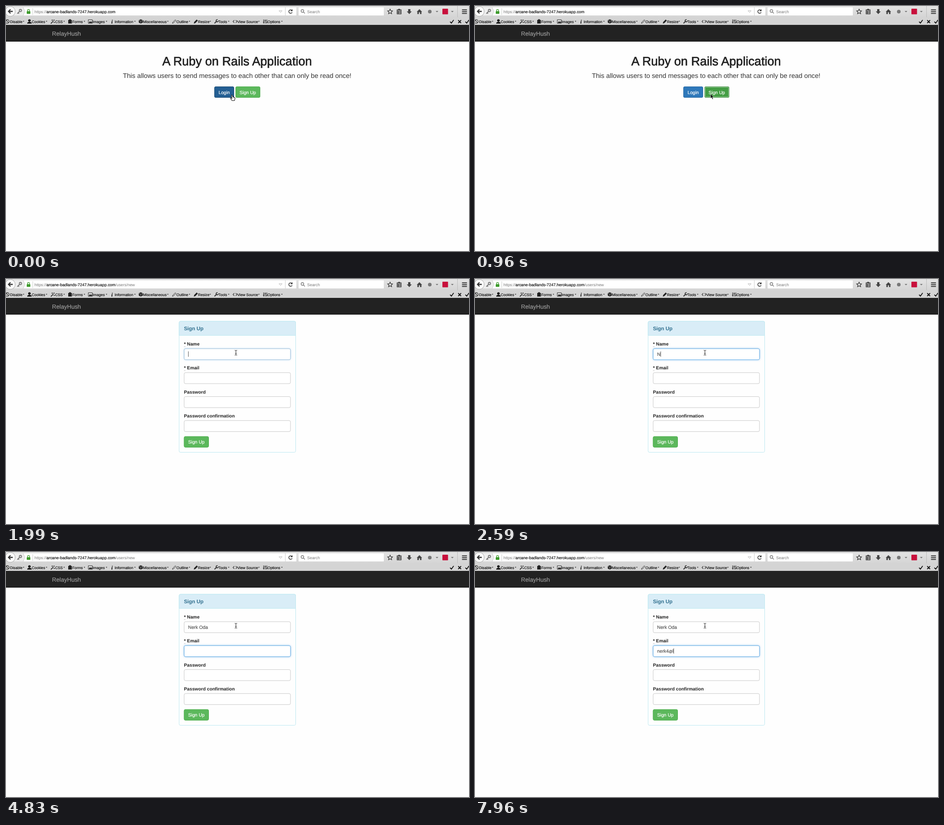
Animation of 1027x545 px, one loop 8000 ms. Source, as an HTML page:

```html
<!DOCTYPE html>
<html lang="en">
<head>
<meta charset="utf-8">
<title>Sign up demo</title>
<style>
html, body { margin: 0; width: 100%; height: 100%; overflow: hidden; background: #fefefe; }
svg { display: block; font-family: "Liberation Sans", Arial, sans-serif; text-rendering: geometricPrecision; }
text { white-space: pre; stroke-width: .2px; }
.ui { font-size: 8.92px; fill: #777; }
.host { fill: #111; stroke: #111; }
.tool { font-size: 8.25px; fill: #111; stroke: #111; }
.body { font-size: 10.27px; fill: #555; stroke: #555; }
.label { font-size: 10.2px; font-weight: bold; fill: #222; }
.btn { font-size: 10.27px; fill: #fff; stroke: #fff; }
.title { font-size: 27.15px; fill: #222; stroke: #222; stroke-width: .75px; }
.lead { font-size: 14.7px; fill: #333; }
.line { fill: none; stroke: #333; stroke-width: 1.3; }
.box { fill: #fff; stroke: #c8c8c8; }
.glow { fill: #fff; stroke: #66afe9; filter: drop-shadow(0 0 2px rgba(102,175,233,.7)); }
#login { fill: #2e78ba; stroke: #2e6da4; }
#login.hover { fill: #245f93; stroke: #204d74; }
#signup { fill: #5cb85c; stroke: #4cae4c; }
#signup.hover { fill: #449d44; stroke: #398439; }
#signup.pressed { fill: #398f39; stroke: #398439; }
</style>
</head>
<body>
<svg width="1027" height="545" viewBox="0 0 1027 545">
  <defs>
    <linearGradient id="chrome" x2="0" y2="1">
      <stop stop-color="#e3e3e3"/><stop offset="1" stop-color="#d4d4d4"/>
    </linearGradient>
  </defs>
  <rect width="1027" height="545" fill="#fefefe"/>

  <!-- address bar -->
  <rect width="1027" height="26" fill="url(#chrome)"/>
  <rect y="25" width="1027" height="17" fill="#d4d4d4"/>
  <rect x="18" y="3" width="626" height="18" fill="#fff"/>
  <path d="M18 3H38L42 12L38 21H18Z" fill="#eee"/>
  <path d="M38 3L42 12L38 21M59.5 5V20M619.5 3V21" fill="none" stroke="#ccc"/>
  <circle cx="9.5" cy="12" r="11" fill="#fafafa" stroke="#aaa"/>
  <path d="M15 12H6M10 7.5L5.5 12L10 16.5" class="line" style="stroke-width:2.3"/>
  <circle cx="32" cy="10" r="2.5" class="line" style="stroke:#777;stroke-width:1.8"/>
  <path d="M30 12L25 17M27 15L29 17" class="line" style="stroke:#777;stroke-width:1.8"/>
  <rect x="46" y="11.5" width="8" height="6" rx="1" fill="#3d9a2b"/>
  <path d="M47.7 12V10a2.3 2.3 0 0 1 4.6 0V12" class="line" style="stroke:#3d9a2b"/>
  <text x="63" y="16" class="ui">https://<tspan class="host">arcane-badlands-7247.herokuapp.com</tspan><tspan id="path"></tspan></text>
  <path d="M605.5 10.5H612.5L609 14.5Z" fill="none" stroke="#bbb"/>
  <path d="M634 9.6A3.9 3.9 0 1 0 634.8 14" class="line" style="stroke-width:1.5"/>
  <path d="M635.5 7V11.5H631Z" fill="#333"/>
  <rect x="649" y="3" width="189" height="18" rx="1" fill="#fff"/>
  <circle cx="657.5" cy="11" r="3" class="line" style="stroke:#777"/>
  <path d="M659.7 13.2L663 16.5" class="line" style="stroke:#777"/>
  <text x="668" y="16" class="ui">Search</text>
  <path d="M852 7L853.6 10.5L857.4 10.9L854.6 13.4L855.4 17.2L852 15.2L848.6 17.2L849.4 13.4L846.6 10.9L850.4 10.5Z" class="line"/>
  <path d="M867.5 8.5H876.5V17.5H867.5ZM867.5 11.5H876.5M867.5 14.5H876.5M870.5 11V17" class="line"/>
  <rect x="870" y="6.5" width="4" height="3" fill="#333"/>
  <path d="M892 7H897V12H900L894.5 18L889 12H892Z" fill="#444"/>
  <path d="M911 13L917 7L923 13H921.5V18H918.3V14H915.7V18H912.5V13Z" fill="#444"/>
  <circle cx="940" cy="12.5" r="4" fill="#777"/>
  <path d="M953 11H959L956 14ZM987 11H993L990 14Z" fill="#777"/>
  <rect x="968" y="6" width="12.5" height="12.5" rx="1" fill="#c8103c"/>
  <path d="M1001.5 0V25" stroke="#bbb"/>
  <path d="M1011.5 8.5H1022.5M1011.5 12.5H1022.5M1011.5 16.5H1022.5" class="line" style="stroke-width:2"/>

  <!-- tool row -->
  <g id="tools"></g>
  <circle cx="3" cy="34.5" r="4" class="line"/><path d="M0 31.5L6 37.5" class="line"/>
  <circle cx="52" cy="32.3" r="2.7"/><path d="M47 39Q47 35.5 52 35.5T57 39Z"/>
  <path d="M99.5 39L105 33.5" class="line" style="stroke-width:1.8"/>
  <path d="M102.5 30V33M101 31.5H104M106.5 30V33M105 31.5H108M107 35V38M105.5 36.5H108.5" stroke="#333"/>
  <path d="M138 31H146V39H138ZM140 29.5H144V32H140Z" fill="#222"/>
  <path d="M182.5 30.5H191.5V38.5H182.5Z" class="line" style="stroke-width:1"/>
  <path d="M183.5 37.5L186 34L188 36L189.5 34L191 37.5Z"/>
  <text x="233.5" y="39" style="font:italic bold 12px 'Liberation Serif',serif">i</text>
  <path d="M299 29.5L303.5 31.7V36.7L299 39.3L294.5 36.7V31.7Z" fill="#222"/>
  <path d="M294.5 32L299 34L303.5 32M299 34V39" fill="none" stroke="#bbb" stroke-width=".7"/>
  <path d="M369 38.5L370 36L375.5 30.5L377.3 32.3L371.5 37.5Z" class="line" style="stroke-width:1"/>
  <path d="M416.5 39L417.5 35.5L423 30L425.5 32.5L420 38Z" fill="#222"/>
  <path d="M462.5 38.5L467.5 33.5" class="line" style="stroke-width:2"/>
  <path d="M469.5 30.5A2.5 2.5 0 1 0 471 33" class="line" style="stroke-width:1.8"/>
  <path d="M506.5 31.5L503.5 34.5L506.5 37.5M509.5 31.5L512.5 34.5L509.5 37.5" class="line"/>
  <path d="M571.5 30V39M575 30V39M578.5 30V39M570 36H573M573.5 32.5H576.5M577 36.5H580" class="line"/>
  <path d="M985 35L988 38L993 31M1019 35L1022 38L1027 31M1003 31.5L1009.5 38M1009.5 31.5L1003 38" class="line" style="stroke:#111;stroke-width:1.8"/>

  <rect y="42" width="1027" height="37" fill="#222"/>
  <rect y="78.2" width="1027" height="1" fill="#080808"/>
  <text x="102" y="65.7" font-size="13.1" fill="#9d9d9d" stroke="#9d9d9d">RelayHush</text>

  <g id="home">
    <text x="512.7" y="132" text-anchor="middle" class="title">A Ruby on Rails Application</text>
    <text x="512.7" y="160" text-anchor="middle" class="lead">This allows users to send messages to each other that can only be read once!</text>
    <rect id="login" x="462.5" y="179.5" width="43" height="24" rx="2.5"/>
    <text x="484" y="195.5" text-anchor="middle" class="btn">Login</text>
    <rect id="signup" x="509.5" y="179.5" width="54" height="24" rx="2.5"/>
    <rect id="ring" x="510.5" y="180.5" width="52" height="22" rx="2" fill="none" stroke="#b4dcb4"/>
    <text x="536.3" y="195.5" text-anchor="middle" class="btn">Sign Up</text>
  </g>

  <g id="form">
    <rect x="384" y="94" width="258.5" height="291.5" rx="3" fill="#fefefe" stroke="#bce8f1"/>
    <path d="M384 125.5V97a3 3 0 0 1 3 -3H639.5a3 3 0 0 1 3 3V125.5Z" fill="#d9edf7" stroke="#bce8f1"/>
    <text x="394.7" y="114.3" font-size="11.5" font-weight="bold" fill="#31708f">Sign Up</text>
    <g id="fields"></g>
    <rect id="glow0" x="395.2" y="155" width="235.8" height="24.5" rx="3" class="glow"/>
    <rect id="glow1" x="395.2" y="208.3" width="235.8" height="24.5" rx="3" class="glow"/>
    <text id="value0" x="404" y="171" class="body"></text>
    <text id="value1" x="404" y="224.3" class="body"></text>
    <rect id="caret" width="1" height="12" fill="#555"/>
    <rect x="395" y="350.3" width="54.5" height="24" rx="3" fill="#5cb85c" stroke="#4cae4c"/>
    <text x="404" y="366.3" class="btn">Sign Up</text>
  </g>

  <path id="hand" d="M-1 1Q0 -1 1.3 1L2 4.5Q3 3.8 3.8 5Q5 4.3 5.5 5.7Q7 5.3 7 7L6.5 10L5.5 12.5H.5L-3 8Q-3.5 6 -1.5 6.7L0 8Z" fill="#fff" stroke="#111" stroke-width="1.1"/>
  <path id="arrow" d="M0 0V10L2.3 8L4 12L5.8 11.2L4.2 7.3H7.2Z" fill="#111" stroke="#fff" stroke-width=".6"/>
  <path id="beam" d="M-2.5 -5.5Q0 -5.5 0 -4Q0 -5.5 2.5 -5.5M0 -4V4M-2.5 5.5Q0 5.5 0 4Q0 5.5 2.5 5.5M-1.5 1.5H1.5" fill="none" stroke="#222"/>
</svg>
<script>
const $ = id => document.getElementById(id);
const LOOP = 8000, FORM_AT = 1100, FOCUS_AT = 660;

// Each track holds [start time, value] steps.
const cursor = [[0, ['hand', 501, 198]], [150, ['hand', 515, 196]], [360, ['hand', 523, 196]],
  [960, ['arrow', 522.5, 195.5]], [1400, ['arrow', 514, 180]], [1540, ['beam', 510, 164]]];
const login = [[0, 'hover'], [150, '']];
const signup = [[0, ''], [360, 'hover'], [FOCUS_AT, 'pressed'], [810, 'hover']];
const glow = [[0, [0, 0]], [1990, [.5, 0]], [2140, [1, 0]], [4380, [0, 1]]];
const caret = [[0, -1], [1990, 0], [4230, 1], [4830, -1], [5280, 1], [6170, -1], [6470, 1], [7070, -1], [7520, 1]];
const typed = [
  ['Nerk Oda', [[0, 0], [2590, 1], [2890, 3], [3040, 4], [3490, 5], [3790, 6], [3940, 7], [4080, 8]]],
  ['nerk4@l', [[0, 0], [5280, 1], [5430, 3], [5570, 4], [6470, 5], [7520, 6], [7960, 7]]]
];
const at = (track, t) => track.findLast(step => step[0] <= t)[1];
const show = (id, on) => $(id).style.display = on ? '' : 'none';

$('tools').innerHTML = [
  ['Disable', 9, 39], ['Cookies', 57, 90], ['CSS', 109, 129], ['Forms', 147, 174],
  ['Images', 192, 223], ['Information', 241, 286], ['Miscellaneous', 304, 359], ['Outline', 378, 407],
  ['Resize', 426, 453], ['Tools', 471, 494], ['View Source', 513, 561], ['Options', 580, 612]
].map(([label, x, tip]) => `<text x="${x}" y="37.7" class="tool">${label}</text>
  <path d="M${tip - 1.5} 33H${tip + 1.5}L${tip} 35.5Z" fill="#333"/>`).join('');

$('fields').innerHTML = ['* Name', '* Email', 'Password', 'Password confirmation'].map((label, i) => {
  const y = 155 + i * 53.3;
  const dots = i < 2 ? `<path d="M395 ${y - 4.5}H399" stroke="#999" stroke-dasharray="1"/>` : '';
  return `<text x="394.8" y="${y - 7}" class="label">${label}</text>${dots}
    <rect x="395.2" y="${y}" width="235.8" height="24.5" rx="3" class="box"/>`;
}).join('');

function draw(now) {
  const t = now % LOOP, onForm = t >= FORM_AT;
  show('home', !onForm);
  show('form', onForm);
  $('path').textContent = onForm ? '/users/new' : '';

  $('login').setAttribute('class', at(login, t));
  $('signup').setAttribute('class', at(signup, t));
  show('ring', t >= FOCUS_AT);

  typed.forEach(([text, track], i) => {
    $('value' + i).innerHTML = text.slice(0, at(track, t)).replace('@', '<tspan font-size="8.2">@</tspan>');
    $('glow' + i).style.opacity = at(glow, t)[i];
  });

  const field = at(caret, t);
  show('caret', field >= 0);
  if (field >= 0) {
    $('caret').setAttribute('x', 404 + $('value' + field).getComputedTextLength());
    $('caret').setAttribute('y', 161 + field * 53.3);
  }

  const [shape, x, y] = at(cursor, t);
  for (const id of ['hand', 'arrow', 'beam']) show(id, id === shape);
  $(shape).setAttribute('transform', `translate(${x} ${y})`);
}

const start = performance.now();
function tick() {
  draw(Math.max(0, performance.now() - start));
  requestAnimationFrame(tick);
}
tick();
</script>
</body>
</html>
```
